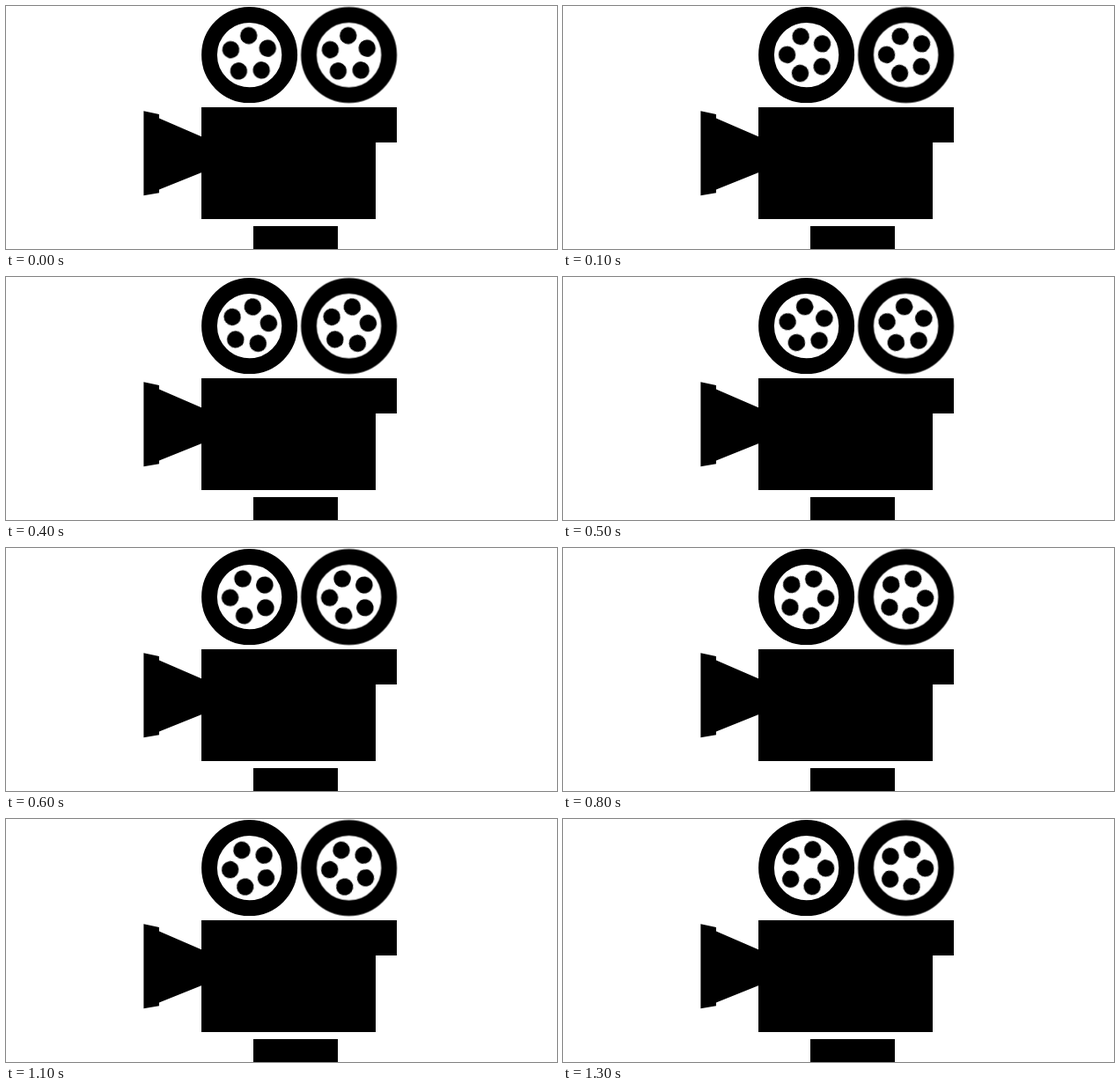
Write an HTML page without scripts that moves like this. It is 626 px wide and 276 px high and loops after 1.4 s.

```html
<!DOCTYPE html>
<html lang="en">
<head>
<meta charset="utf-8">
<title>Film camera</title>
<style>
  html, body { margin: 0; width: 100%; height: 100%; overflow: hidden; background: #fff; }
  svg { display: block; width: 626px; height: 276px; }
  .spin { transform-origin: 0 0; animation: spin 1.4s steps(14, end) infinite; }
  /* 15 degrees per step, then a jump back to the start */
  @keyframes spin {
    from { transform: rotate(-2.2deg); }
    to { transform: rotate(-212.2deg); }
  }
</style>
</head>
<body>
<svg viewBox="0 0 626 276">
  <defs>
    <circle id="rim" r="45.6" fill="#fff" stroke="#000" stroke-width="17.8"/>
    <circle id="hole" cy="-22" r="9.7"/>
    <g id="holes">
      <use href="#hole"/>
      <use href="#hole" transform="rotate(72)"/>
      <use href="#hole" transform="rotate(144)"/>
      <use href="#hole" transform="rotate(216)"/>
      <use href="#hole" transform="rotate(288)"/>
    </g>
  </defs>

  <g transform="translate(276.6 55.6)">
    <use href="#rim"/>
    <use href="#holes" class="spin"/>
  </g>
  <g transform="translate(389.6 55.6)">
    <use href="#rim"/>
    <use href="#holes" class="spin"/>
  </g>

  <path d="M222 115H444V155H420V242H222Z"/>
  <path d="M156.4 119.2L174 123V127.5L222.5 148.6V189L174 208.5V212.3L156.4 215.2Z"/>
  <path d="M281 250H377V276H281Z"/>
</svg>
</body>
</html>
```
